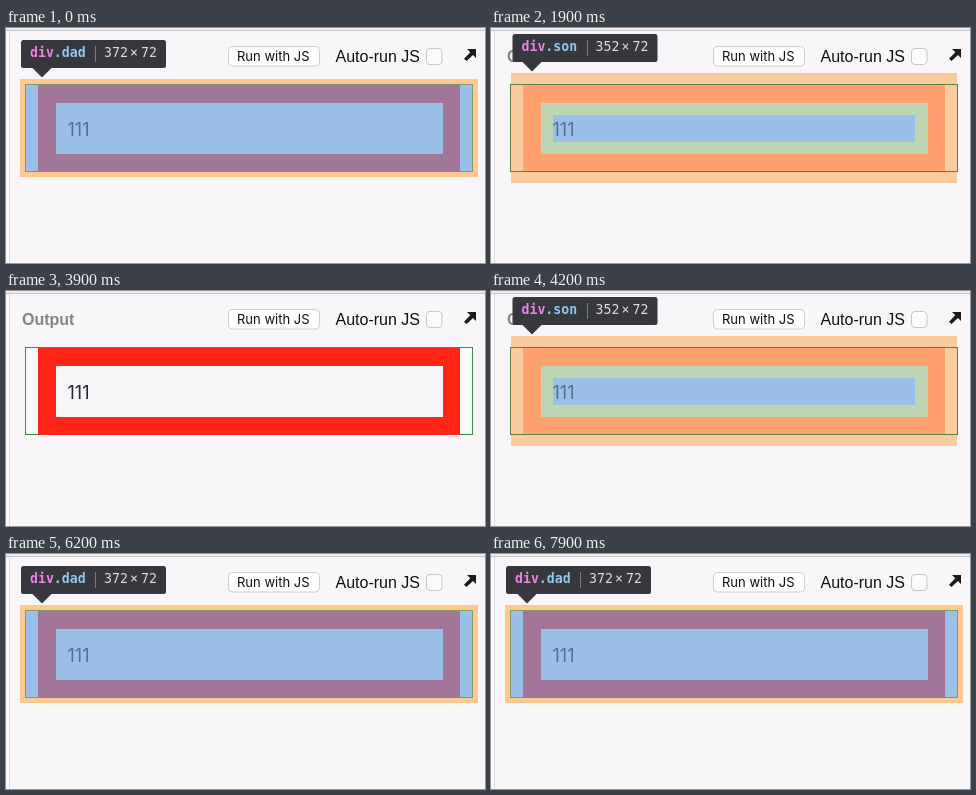
An HTML page that plays this animation: 479x235 px, repeating every 8000 ms.

```html
<!DOCTYPE html>
<html lang="en">
<head>
<meta charset="utf-8">
<title>Box model inspector</title>
<style>
  html, body { margin: 0; width: 100%; height: 100%; overflow: hidden; background: #f8f6f8; }
  svg { display: block; width: 479px; height: 235px; }
  text { white-space: pre; }
  rect, .flat { shape-rendering: crispEdges; }
  .round { shape-rendering: auto; }
  .ui { font: 16px "Liberation Sans", Arial, sans-serif; fill: #111; }
  .button { font: 13px Inter, sans-serif; fill: #111; }
  .value { font: 18px Inter, sans-serif; fill: #25252b; }
  .tip { font: 13.2px "DejaVu Sans Mono", monospace; fill: #dcdde0; }
  .tag { font-weight: bold; fill: #ee82e6; }
  .class { font-weight: bold; fill: #8fc9ee; }
</style>
</head>
<body>
<svg viewBox="0 0 479 235">
  <rect width="479" height="235" fill="#f8f6f8"/>
  <rect width="3" height="235" fill="#fbfafb"/>
  <rect x="3" y="3" width="1" height="232" fill="#dedcde"/>
  <rect width="479" height="2" fill="#eeecee"/>
  <rect y="2" width="479" height="1" fill="#c6c4c6"/>

  <text class="ui" x="16" y="33.5" style="font-weight:bold;fill:#858385">Output</text>
  <rect class="round" x="222.5" y="18.5" width="91" height="19.5" rx="4" fill="#fff" stroke="#cfcdcf"/>
  <text class="button" x="231" y="33">Run with JS</text>
  <text class="ui" x="329.5" y="33.5">Auto-run JS</text>
  <rect class="round" x="420.5" y="20.5" width="15.5" height="16" rx="3.5" fill="#fcfbfc" stroke="#c8c6c8"/>
  <path d="M461 21H470V30L467 27L460.5 33L458 30.7L464.3 24.3Z" fill="#1b1b1d"/>

  <g id="plain">
    <rect x="19.5" y="56.5" width="447" height="87" fill="#f9f8fa" stroke="#3f8a42"/>
    <rect x="32" y="57" width="422" height="87" fill="#ff2618"/>
    <rect x="50" y="75" width="387" height="51" fill="#f8f6f8"/>
    <text class="value" x="61.5" y="107.5">111</text>
  </g>

  <g id="dad">
    <rect x="14" y="51" width="458" height="98" fill="#ffc890"/>
    <rect x="19.5" y="56.5" width="447" height="87" fill="#9bc0e8" stroke="#829a63"/>
    <rect x="32" y="57" width="422" height="87" fill="#a27699"/>
    <rect x="50" y="75" width="387" height="51" fill="#9bc0e8"/>
    <text class="value" x="61.5" y="107.5" style="fill:#53708f">111</text>
  </g>

  <g id="son">
    <rect x="20" y="45" width="446" height="110" fill="#f9cb9f"/>
    <rect x="32" y="57" width="422" height="87" fill="#ffa06f"/>
    <rect x="50" y="75" width="387" height="51" fill="#bdd5b5"/>
    <rect x="62" y="87" width="362" height="27" fill="#9bc0e8"/>
    <rect x="19.5" y="56.5" width="447" height="87" fill="none" stroke="#5f7f42"/>
    <text class="value" x="61.5" y="107.5" style="fill:#53708f">111</text>
  </g>
</svg>
<script>
  const LOOP = 8000;
  const steps = [
    [0, "dad"], [400, "son"], [3000, "plain"], [4100, "son"],
    [5400, "dad"], [5700, "son"], [6000, "dad"], [6600, "son"],
    [7200, "dad"], [7400, "son"], [7700, "dad"]
  ];
  const layers = ["plain", "dad", "son"].map(id => document.getElementById(id));

  function addTip(name, x, y, width, tip) {
    document.getElementById(name).insertAdjacentHTML("beforeend", `
      <g transform="translate(${x} ${y})">
        <rect class="round" width="${145}" height="28" rx="2.5" fill="#36383e"/>
        <path d="M${tip - 10} 27.5H${tip + 10}L${tip} 37.5Z" fill="#36383e"/>
        <text class="tip" x="9" y="17.3"><tspan class="tag">div</tspan><tspan class="class">.${name}</tspan></text>
        <rect x="74" y="6" width="1" height="16" fill="#777a80"/>
        <text class="tip" y="17.3"><tspan x="83">${width}</tspan><tspan x="109">×</tspan><tspan x="120">72</tspan></text>
      </g>`);
  }
  addTip("dad", 15, 12, 372, 21);
  addTip("son", 21.5, 6, 352, 19.5);

  const start = performance.now();
  function draw(now) {
    const t = Math.max(0, now - start) % LOOP;
    const state = steps.filter(([at]) => at <= t).pop()[1];
    for (const layer of layers)
      layer.style.display = layer.id === state ? "" : "none";
    requestAnimationFrame(draw);
  }
  draw(start);
</script>
</body>
</html>
```
